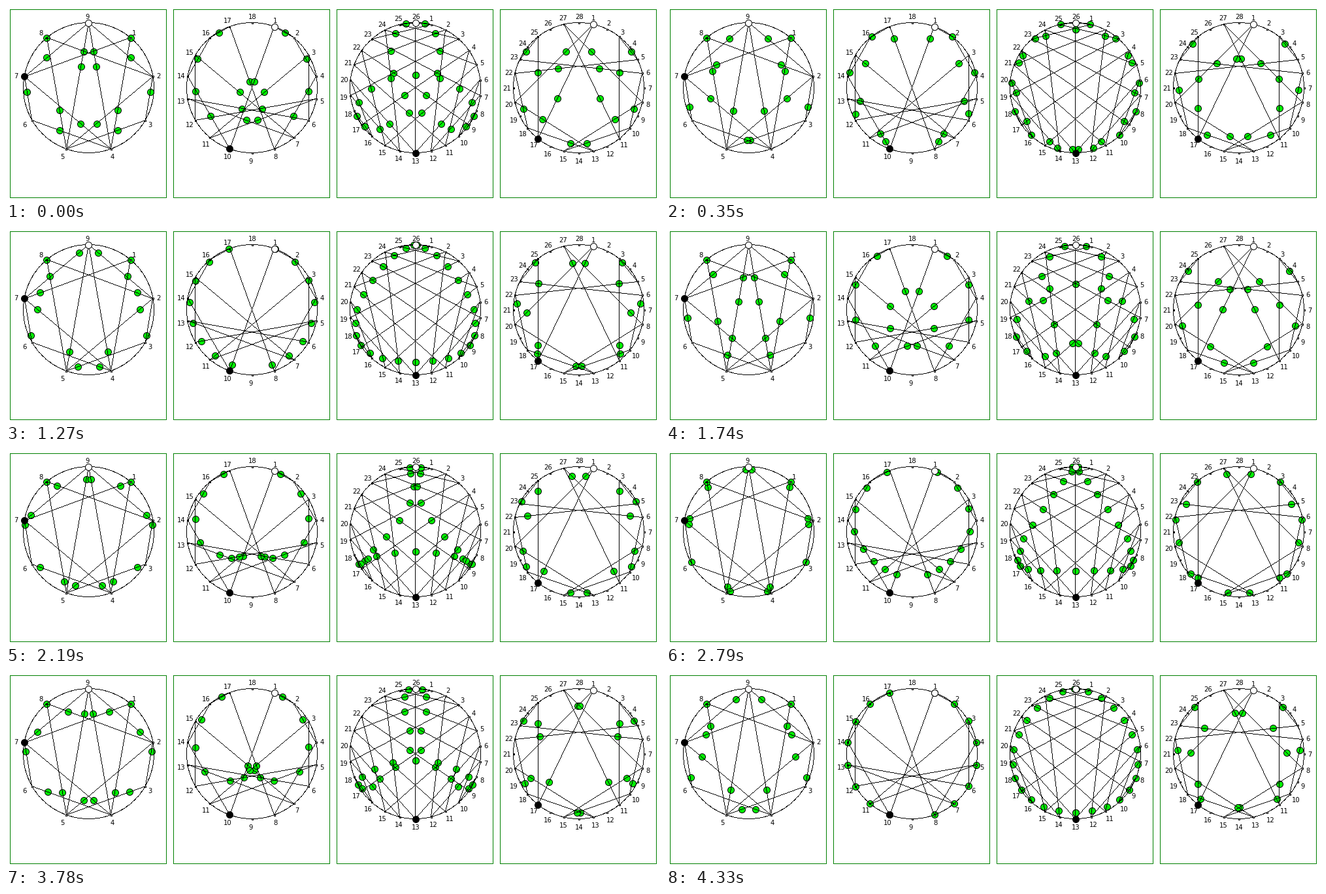
Recreate the animation shown at these times as a matplotlib script. Size 1001x298 px, loop 4.38 s.

```python
import numpy as np
import matplotlib.pyplot as plt
from matplotlib.animation import FuncAnimation
from matplotlib.patches import Rectangle

W, H, DPI = 1001, 298, 64
PX = 72 / DPI                      # points per pixel
RADIUS, LABEL_RADIUS = 100, 111
GREEN = "#00f000"
BLACK, WHITE, BORDER = (0, 0, 0, 255), (255, 255, 255, 255), (0, 128, 0, 255)
STEP = 10                          # ms per drawn frame

# Each panel maps r to m*r modulo a prime; `half` seats r = 1..p//2 on the ring.
# nodes, prime, multiplier, phase in ticks, half
PANELS = [
    (9, 17, 10, 0, lambda r: (6 * r - 1) // 10),
    (18, 17, 2, 4, lambda r: r),
    (26, 29, 27, 5, lambda r: r - 1),
    (28, 17, 12, 0, lambda r: 5 * r // 3),
]

# Frame holds and the tick (a twentieth of an edge) reached at a few poses.
POSES = {0: 7, 13: 24, 25: 37, 43: 62, 55: 79, 74: 104, 85: 116}
holds = np.full(86, 50)
holds[[5, 33, 55, 70]] = 70
ends = np.cumsum(holds)
ticks = np.floor(np.interp(np.arange(86), list(POSES), list(POSES.values())) + 1e-9)


def seat(r, n, p, half):
    """Ring node of residue r; the upper residues mirror the lower ones."""
    return (half(r) if 2 * r < p else n - half(p - r)) or n


def spot(i, k, n, radius=RADIUS):
    a = 2 * np.pi * k / n
    return np.array([126 + 250 * i + radius * np.sin(a), 125 - radius * np.cos(a)])


def add_axes(z):
    ax = fig.add_axes([0, 0, 1, 1], zorder=z)
    ax.set_xlim(-0.5, W - 0.5)
    ax.set_ylim(H - 0.5, -0.5)
    ax.axis("off")
    return ax


def plot(points, colour=BLACK):
    x, y = np.round(np.array(points)).astype(int).T
    ink[y, x] = colour


def line(a, b, colour=BLACK):
    """One pixel wide line without smoothing."""
    a, b = np.round(a), np.round(b)
    steps = int(max(abs(b - a)))
    plot(np.linspace(a, b, steps + 1), colour)


def square(point, filled):
    x, y = np.round(point + 0.6).astype(int)
    ink[y - 1:y + 2, x - 1:x + 2] = BLACK
    if not filled:
        ink[y, x] = WHITE


def markers(ax, points, fill):
    x, y = np.array(points).T
    return ax.scatter(x, y, s=(10 * PX) ** 2, c=fill, edgecolors="black", linewidths=PX)


fig = plt.figure(figsize=(W / DPI, H / DPI), dpi=DPI, facecolor="none")

# Labels are rendered once; the line work is then inked onto the same layer.
ax = add_axes(1)
for i, (n, *_) in enumerate(PANELS):
    inner = Rectangle((10.5 + 250 * i, 8), 230, 285, fc="none", ec="none")
    ax.add_patch(inner)
    for k in range(1, n + 1):
        x, y = spot(i, k, n, LABEL_RADIUS)
        label = ax.text(x + (-2 if k < 10 else 1), y + 2, str(k), size=10 * PX,
                        family="DejaVu Sans", ha="center", va="center")
        label.set_clip_path(inner)
fig.canvas.draw()
ink = np.array(fig.canvas.buffer_rgba())
ax.remove()
fig.set_facecolor("white")

start, end, phase, opens, discs = [], [], [], [], []
for i, (n, p, m, shift, half) in enumerate(PANELS):
    x = 6 + 250 * i
    corners = np.array([(x, 5), (x + 239, 5), (x + 239, 294), (x, 294)])
    for a, b in zip(corners, np.roll(corners, 1, axis=0)):
        line(a, b, BORDER)
    plot([spot(i, t, 800) for t in range(800)])

    for r in range(1, p):
        a, b = (spot(i, seat(s, n, p, half), n) for s in (r, m * r % p))
        line(a, b)
        start.append(a)
        end.append(b)
        phase.append(shift)

    first = seat(1, n, p, half)
    dark = seat(pow(m, -1, p), n, p, half)   # the node that leads to the first
    for k in range(1, n + 1):
        square(spot(i, k, n), dark <= k < n)
    opens.append(spot(i, first, n))
    discs.append(spot(i, dark, n))

start, end, phase = map(np.array, (start, end, phase))
dots = markers(add_axes(1), start, GREEN)
fig.figimage(ink, zorder=2)
top = add_axes(3)
markers(top, opens, "white")
markers(top, discs, "black")


def update(f):
    tick = ticks[np.searchsorted(ends, f * STEP, side="right")]
    p = ((tick + phase) % 20 / 20)[:, None]
    dots.set_offsets(start + (end - start) * p)
    return [dots]


anim = FuncAnimation(fig, update, frames=int(ends[-1]) // STEP, interval=STEP,
                     init_func=lambda: update(0), repeat=True, repeat_delay=0)
plt.show()
```
